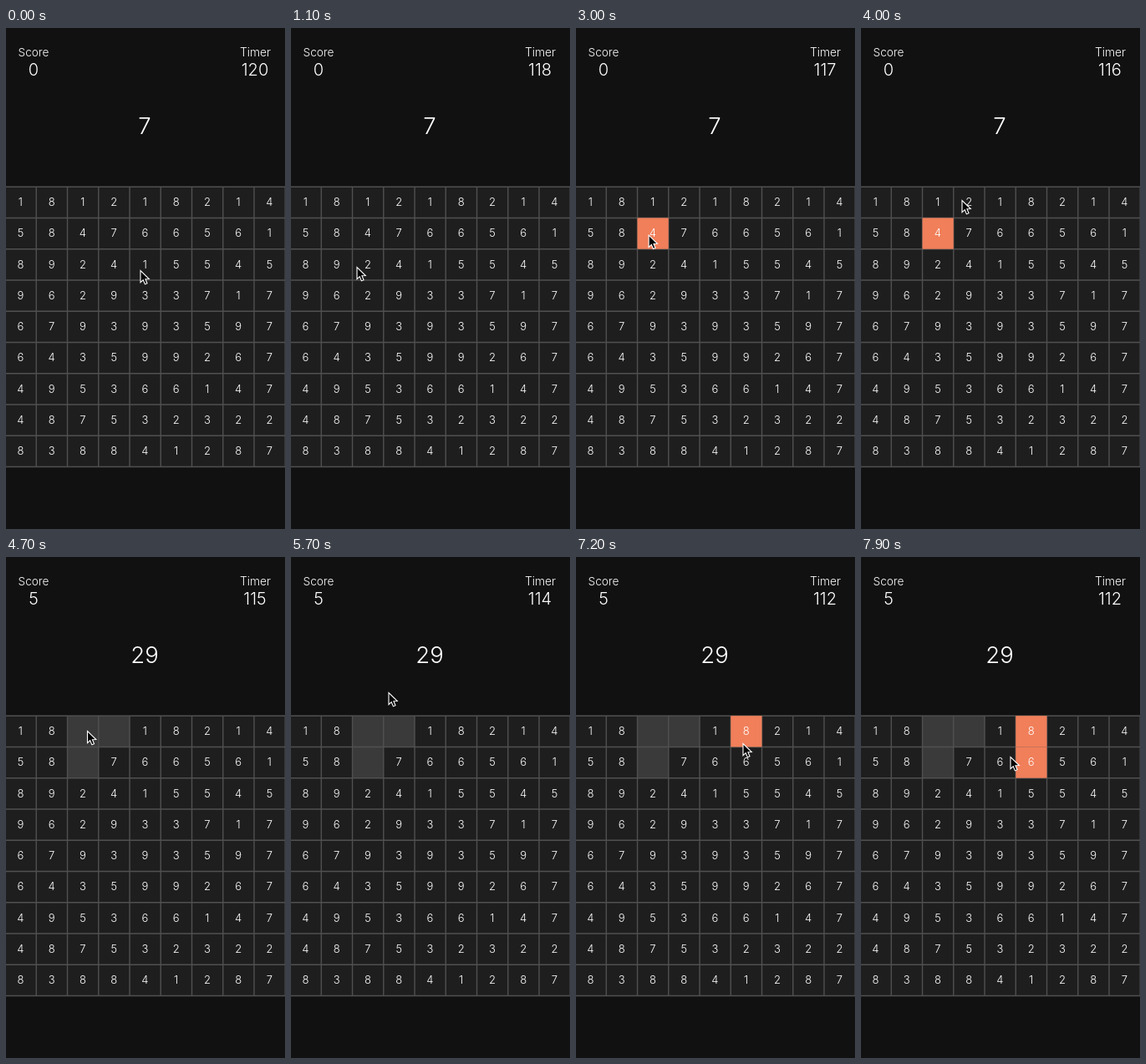
Write an HTML page with a canvas that moves like this. It is 334x600 px and loops after 8000 ms.

```html
<!DOCTYPE html>
<html lang="en">
<head>
<meta charset="utf-8">
<title>Number sum game</title>
<style>
html, body { margin: 0; width: 100%; height: 100%; overflow: hidden; background: #111; }
canvas { display: block; }
</style>
</head>
<body>
<canvas id="stage" width="334" height="600"></canvas>
<script>
const ctx = document.getElementById('stage').getContext('2d');
const LOOP = 8000, STEP = 100, SOLVED = 4700;
const SIZE = 37.25, LEFT = -1, TOP = 190.2, COUNT = 9, SPAN = SIZE * COUNT;
const BOARD = `181218214 584766561 892415545 962933717 679393597
  643599267 495366147 487532322 838841287`.split(/\s+/);

// Picked cells: row, column, time
const PICKS = [[1, 2, 2400], [0, 3, 4200], [0, 2, SOLVED], [0, 5, 7000], [1, 5, 7800]];

// Pointer moves: start, end, x, y; it rests in between
const MOVES = [
  [0, 0, 161, 290], [0, 500, 118, 409], [500, 1000, 68, 312], [1000, 1100, 79, 286],
  [1100, 2100, 86, 248], [2800, 3600, 93, 246], [3800, 4000, 121, 206],
  [4100, 4300, 97.5, 208], [5200, 5700, 117, 162], [5800, 6200, 214, 220],
  [6400, 6600, 200, 208], [7000, 7400, 200, 238], [7700, 7900, 179, 239]
];
const ARROW = new Path2D('M0 0V14.2L3.2 11.2L5.4 16.4L8 15.3L5.9 10.3L10.3 10.1Z');

function ease(t, start, end) {
  const k = Math.min(1, Math.max(0, (t - start) / (end - start || 1)));
  return k * k * (3 - 2 * k);
}

function pointerAt(t) {
  let [, , x, y] = MOVES[0];
  for (const [start, end, toX, toY] of MOVES) {
    const k = ease(t, start, end);
    x += (toX - x) * k;
    y += (toY - y) * k;
  }
  return [x, y];
}

function text(str, x, baseline, size) {
  ctx.font = `300 ${size}px Montserrat, Inter, sans-serif`;
  ctx.textAlign = 'center';
  ctx.fillStyle = '#fff';
  ctx.fillText(str, x, baseline);
}

function fillCell(row, col, color) {
  ctx.fillStyle = color;
  ctx.fillRect(LEFT + col * SIZE, TOP + row * SIZE, SIZE, SIZE);
}

function drawLines() {
  ctx.strokeStyle = '#505050';
  ctx.lineWidth = 1.4;
  ctx.beginPath();
  for (let i = 0; i <= COUNT; i++) {
    const x = LEFT + i * SIZE, y = TOP + i * SIZE;
    ctx.moveTo(x, TOP);
    ctx.lineTo(x, TOP + SPAN);
    ctx.moveTo(0, y);
    ctx.lineTo(334, y);
  }
  ctx.stroke();
}

function drawBoard(t) {
  const isCleared = ([, , time]) => t >= SOLVED && time <= SOLVED;
  const cleared = PICKS.filter(isCleared);
  const active = PICKS.filter(pick => t >= pick[2] && !isCleared(pick));

  ctx.fillStyle = '#1e1e1e';
  ctx.fillRect(0, TOP, 334, SPAN);
  for (const [row, col] of cleared) fillCell(row, col, '#3a3a3a');
  drawLines();
  for (const [row, col] of active) fillCell(row, col, '#f07f5a');

  BOARD.forEach((digits, row) => [...digits].forEach((digit, col) => {
    if (cleared.some(pick => pick[0] === row && pick[1] === col)) return;
    text(digit, 17.4 + col * SIZE, 213.2 + row * SIZE, 13);
  }));
}

function drawPointer(x, y) {
  ctx.save();
  ctx.translate(x, y + 0.5);
  ctx.fillStyle = '#000';
  ctx.fill(ARROW);
  ctx.strokeStyle = '#fff';
  ctx.lineWidth = 1.1;
  ctx.stroke(ARROW);
  ctx.restore();
}

function draw(t) {
  const solved = t >= SOLVED;
  ctx.fillStyle = '#111';
  ctx.fillRect(0, 0, 334, 600);
  text('Score', 33, 34.3, 13.6);
  text(solved ? 5 : 0, 33, 57, 20);
  text('Timer', 298.5, 34.3, 13.8);
  text(120 - Math.floor((t + 900) / 1000), 298, 57, 20);
  text(solved ? 29 : 7, 166, 126.5, 27.5);
  drawBoard(t);
  drawPointer(...pointerAt(t));
}

const begin = performance.now();
function frame() {
  const t = (performance.now() - begin) % LOOP;
  draw(Math.floor(t / STEP) * STEP);
  requestAnimationFrame(frame);
}
frame();
</script>
</body>
</html>
```
